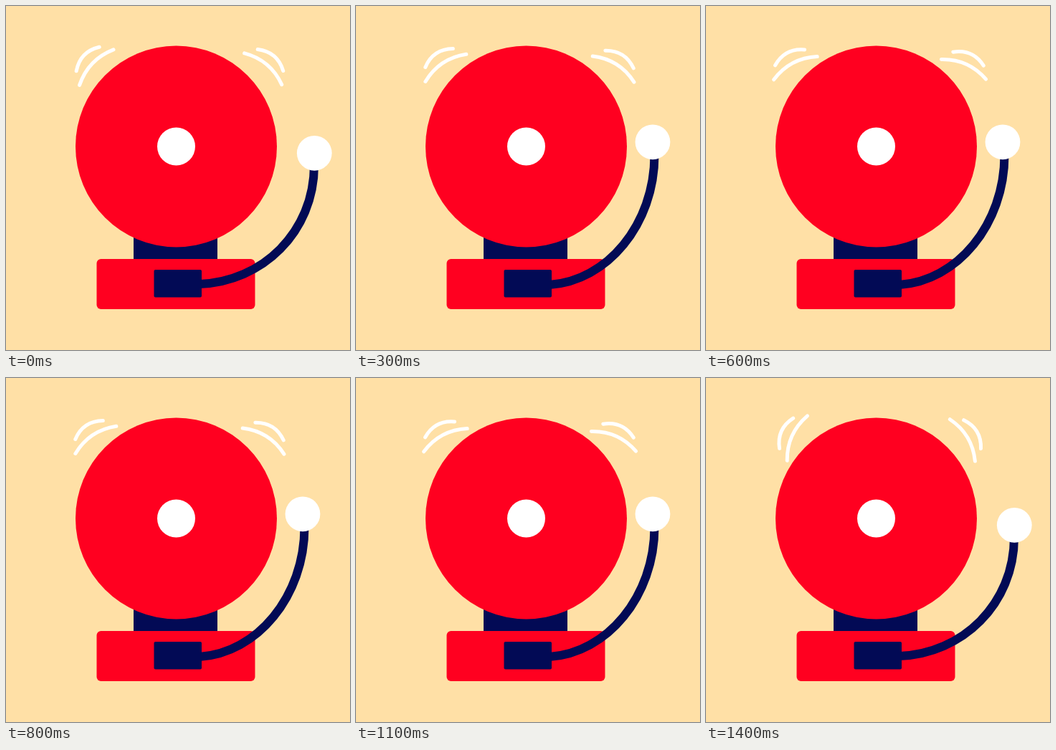
These frames come from a looping animation (480 px wide and 480 px high, 1500 ms). An HTML page:

```html
<!DOCTYPE html>
<html lang="en">
<head>
<meta charset="utf-8">
<title>Alarm bell</title>
<style>
  html, body { margin: 0; width: 100%; height: 100%; overflow: hidden; background: #ffe0a6; }
  svg { display: block; width: 100vw; height: 100vh; }
  .red { fill: #ff0020; }
  .navy { fill: #020a55; }
  .white { fill: #fff; }
  .arm { fill: none; stroke: #020a55; stroke-width: 12; }
  .wave { fill: none; stroke: #fff; stroke-width: 5; stroke-linecap: round; }
</style>
</head>
<body>
<svg viewBox="0 0 480 480">
  <rect class="navy" x="178" y="315" width="117" height="42"/>
  <rect class="red" x="126.5" y="353" width="221" height="70" rx="6"/>
  <circle class="red" cx="237.5" cy="196" r="140.5"/>
  <circle class="white" cx="237.5" cy="196" r="26.5"/>
  <g id="out">
    <path class="arm" d="M270 388C357 385 430 316 430 222"/>
    <circle class="white" cx="430.3" cy="205.3" r="24.4"/>
  </g>
  <g id="in">
    <path class="arm" d="M270 389C350 384 416.5 305 416.5 208"/>
    <circle class="white" cx="414" cy="189.8" r="24.4"/>
  </g>
  <rect class="navy" x="206.5" y="368" width="66.5" height="38.5" rx="2"/>
  <g id="left" class="wave">
    <path d="M-34.3 5.5Q0 -10.5 34.3 5.5"/>
    <path d="M-23.2 -11.2Q0 -26.2 23.2 -11.2"/>
  </g>
  <g id="right" class="wave">
    <path d="M-34 3.6Q0 -12.4 34 3.6"/>
    <path d="M-23.2 -12.4Q0 -27.4 23.2 -12.4"/>
  </g>
</svg>
<script>
  const STEP = 100;
  // Left tilt, right tilt, hammer touching the bell
  const poses = [
    [46.3, 40, false],
    [28, 24, true],
    [59.3, 53, false],
    [33.8, 32, true],
    [65.7, 59, false]
  ];
  const $ = id => document.getElementById(id);
  const place = (id, x, y, deg) =>
    $(id).setAttribute('transform', `translate(${x} ${y}) rotate(${deg})`);
  const show = (id, on) => $(id).setAttribute('visibility', on ? 'visible' : 'hidden');

  function draw(ms) {
    const [left, right, hit] = poses[Math.floor(ms / STEP) % poses.length];
    place('left', 122.3, 81.8, -left);
    place('right', 361, 85, right);
    show('in', hit);
    show('out', !hit);
  }

  const start = performance.now();
  function tick() {
    draw(performance.now() - start);
    requestAnimationFrame(tick);
  }
  tick();
</script>
</body>
</html>
```
